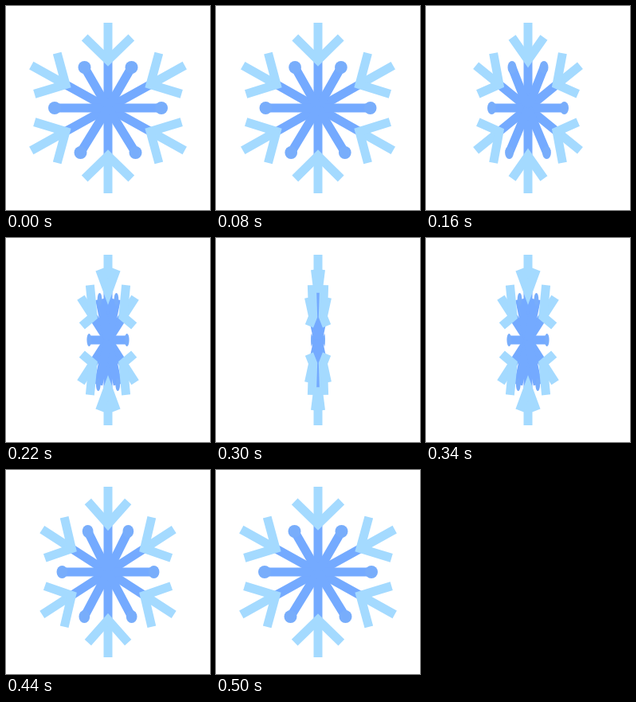
These frames come from a looping animation (256x256 px, 560 ms). An HTML page with a canvas:

```html
<!DOCTYPE html>
<html lang="en">
<head>
<meta charset="utf-8">
<title>Turning snowflake</title>
<style>
  html, body { margin: 0; height: 100%; overflow: hidden; background: #fff; }
  canvas { display: block; }
</style>
</head>
<body>
<canvas width="256" height="256"></canvas>
<script>
const ctx = document.querySelector('canvas').getContext('2d');
const LOOP = 560, STEP = 20, START = 60, END = 500;
const ARM = '#74aaff', KNOB = '#78adfb', TIP = '#a4daff';

const knobs = [[67, 0], [29.5, -51], [34.5, 56]].flatMap(([x, y]) => [[x, y], [-x, y]]);
// angle from vertical, distance of the fork, distance of the outer end
const sprigs = [[0, 60, 107], [61, 60.7, 110], [119, 60.7, 110],
                [180, 60, 107], [241, 60.7, 110], [299, 60.7, 110]];

// cubic-bezier(a, 0, 1 - a, 1)
function ease(x, a = 0.24) {
  let lo = 0, hi = 1;
  for (let i = 0; i < 24; i++) {
    const u = (lo + hi) / 2;
    if (3 * a * u + (3 - 9 * a) * u * u + (6 * a - 2) * u ** 3 < x) lo = u;
    else hi = u;
  }
  return lo * lo * (3 - 2 * lo);
}

// Points shrink sideways while the line weight stays the same.
function line(squeeze, color, ...points) {
  ctx.beginPath();
  for (const [x, y] of points) ctx.lineTo(x * squeeze, y);
  ctx.strokeStyle = color;
  ctx.stroke();
}

function draw(time) {
  const progress = Math.min(1, Math.max(0, (time - START) / (END - START)));
  const squeeze = 1 - 2 * ease(progress);

  ctx.setTransform(1, 0, 0, 1, 0, 0);
  ctx.clearRect(0, 0, 256, 256);
  ctx.translate(128, 128);
  ctx.lineWidth = 11;
  ctx.miterLimit = 4;

  const forks = sprigs.map(([degrees, fork, end]) => {
    const angle = degrees * Math.PI / 180, c = Math.cos(angle), s = Math.sin(angle);
    const at = (x, y) => [x * c + y * s, x * s - y * c];
    return { base: at(0, fork), end: at(0, end),
             left: at(-29.3, fork + 28.5), right: at(29.3, fork + 28.5) };
  });

  for (const { base } of forks) line(squeeze, ARM, [0, 0], base);
  for (const knob of knobs) line(squeeze, ARM, [0, 0], knob);

  ctx.fillStyle = KNOB;
  for (const [x, y] of knobs) {
    ctx.beginPath();
    ctx.ellipse(x * squeeze, y, 8 * Math.abs(squeeze), 8, 0, 0, 2 * Math.PI);
    ctx.fill();
  }

  for (const { base, end, left, right } of forks) {
    line(squeeze, TIP, base, end);
    line(squeeze, TIP, left, base, right);
  }
}

function tick() {
  const time = performance.now() % LOOP;
  draw(Math.floor(time / STEP) * STEP);
  requestAnimationFrame(tick);
}
tick();
</script>
</body>
</html>
```
